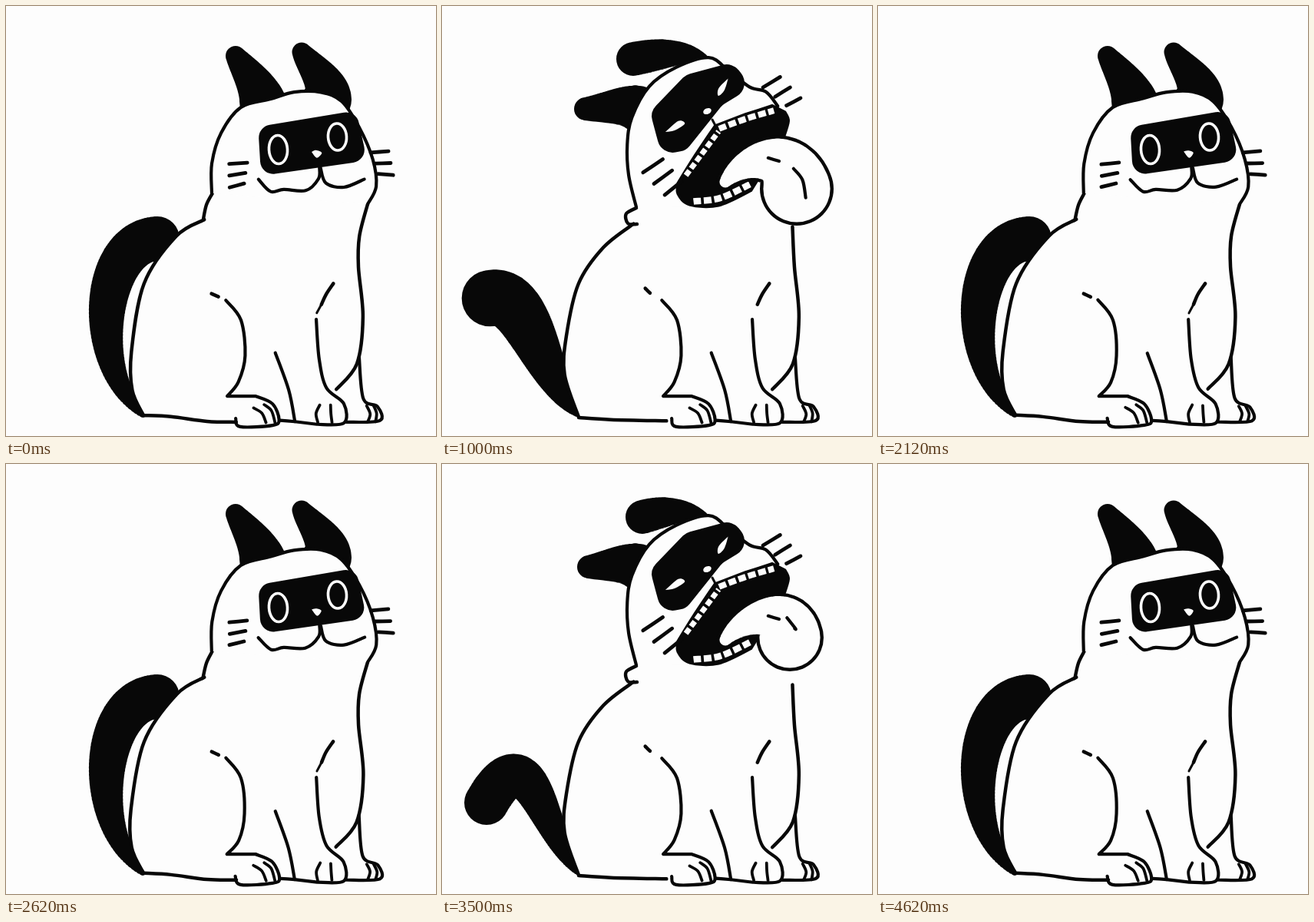
Write an HTML page with a canvas that moves like this. It is 560 px wide and 560 px high and loops after 4.75 s.

```html
<!DOCTYPE html>
<html lang="en">
<head>
<meta charset="utf-8">
<title>Cat</title>
<style>
  html, body { margin: 0; width: 100%; height: 100%; overflow: hidden; background: #fdfdfd; }
  canvas { display: block; width: 100vmin; height: 100vmin; }
</style>
</head>
<body>
<canvas id="stage" width="560" height="560"></canvas>
<script>
const ctx = document.getElementById('stage').getContext('2d');
const INK = '#080808', PAPER = '#fdfdfd';
const LOOP = 4750;
let boil = 0;

const parse = text => text.split(' ').map(p => p.split(',').map(Number));
const mix = (a, b, t) => a + (b - a) * t;

// Small repeatable wobble, so that shared points stay joined
function wobble([x, y]) {
  const noise = seed => {
    const n = Math.sin(x * 12.99 + y * 78.23 + boil * seed) * 43758.5;
    return n - Math.floor(n) - 0.5;
  };
  return [x + noise(37.7) * 0.9, y + noise(83.2) * 0.9];
}

// Smooth curve through the points; "|" marks a sharp corner
function trace(text) {
  const path = new Path2D();
  text.split('|').forEach((part, n) => {
    const p = parse(part).map(wobble);
    path[n ? 'lineTo' : 'moveTo'](...p[0]);
    for (let i = 0; i < p.length - 1; i++) {
      const b = p[i], c = p[i + 1], a = p[i - 1] || b, d = p[i + 2] || c;
      path.bezierCurveTo(
        b[0] + (c[0] - a[0]) / 6, b[1] + (c[1] - a[1]) / 6,
        c[0] - (d[0] - b[0]) / 6, c[1] - (d[1] - b[1]) / 6, ...c);
    }
  });
  return path;
}

function line(text, width = 4.2, color = INK) {
  ctx.lineWidth = width;
  ctx.strokeStyle = color;
  ctx.stroke(trace(text));
}

function fill(text, color = PAPER) {
  ctx.fillStyle = color;
  ctx.fill(trace(text));
}

// Polygon with rounded corners
function patch(text, radius) {
  const p = parse(text).map(wobble), last = p[p.length - 1];
  ctx.beginPath();
  ctx.moveTo((last[0] + p[0][0]) / 2, (last[1] + p[0][1]) / 2);
  p.forEach((q, i) => ctx.arcTo(...q, ...p[(i + 1) % p.length], radius));
  ctx.fillStyle = INK;
  ctx.fill();
}

// Soft limb: discs along a Bezier curve, growing from radius r0 to r1
function limb([x0, y0, x1, y1, x2, y2, x3, y3], r0, r1, power = 1, color = INK, grow = 0) {
  const bezier = (a, b, c, d, t) => {
    const s = 1 - t;
    return a * s ** 3 + 3 * b * s * s * t + 3 * c * s * t * t + d * t ** 3;
  };
  ctx.fillStyle = color;
  ctx.beginPath();
  for (let t = 0; t <= 1; t += 1 / 64) {
    const x = bezier(x0, x1, x2, x3, t), y = bezier(y0, y1, y2, y3, t);
    const r = mix(r0, r1, 1 - (1 - t) ** power) + grow;
    ctx.moveTo(x + r, y);
    ctx.arc(x, y, r, 0, Math.PI * 2);
  }
  ctx.fill();
}

function oval(x, y, rx, ry, turn, ring) {
  ctx.beginPath();
  ctx.ellipse(x, y, rx, ry, turn, 0, Math.PI * 2);
  ctx.fillStyle = ctx.strokeStyle = PAPER;
  ctx.lineWidth = ring;
  if (ring) ctx.stroke(); else ctx.fill();
}

// Three strokes, each stepped on from the one before
function whiskers(x, y, stepX, stepY, dx, dy, turn = 0) {
  for (let i = 0; i < 3; i++) {
    const sx = x + i * stepX, sy = y + i * stepY;
    line(`${sx},${sy} ${sx + dx - i * 2},${sy + dy + i * turn}`, 4.8);
  }
}

function teeth(text, width, size) {
  ctx.lineCap = 'butt';
  ctx.setLineDash([size, 3.5]);
  line(text, width, PAPER);
  ctx.setLineDash([]);
  ctx.lineCap = 'round';
}

// ---- Tail: two control points, tip and tip radius, from curled to low ----
const TAIL = [
  [105, 470, 121, 306, 197, 303, 29],
  [130, 470, 140, 375, 90, 342, 38],
  [130, 470, 140, 355, 79, 363, 41],
  [130, 490, 108, 370, 60, 383, 36],
  [130, 480, 115, 340, 58, 441, 29]
];

// Whips out faster and faster, then floats back
function tailPlace(step) {
  const age = step < 19 ? step - 3 : step - 22;
  if (age <= 0 || age >= 13.8) return 0;
  return age < 6 ? 4 * (age / 6) ** 1.8 : 2 + 2 * Math.cos(Math.PI * (age - 6) / 7.8);
}

function drawTail(step) {
  const place = tailPlace(step), k = Math.min(3, Math.floor(place));
  const pose = TAIL[k].map((v, i) => mix(v, TAIL[k + 1][i], place - k));
  limb([178, 531, ...pose.slice(0, 6)], 5, pose[6], 2.2);
}

// ---- Body ----
function drawBody(howl) {
  const back = howl
    ? '250,284 210,314 178,362 162,430 160,480 178,535'
    : '258,278 222,300 180,362 163,450 164,500 179,533';
  const floor = howl ? '178,536 220,539 292,540' : '179,533 215,535 262,541 300,542';
  const belly = '430,499 457,466 465,405 459,340 ' + (howl ? '456,287' : '460,300 471,258');
  fill([back, floor, '440,540', belly, '440,230', '270,240'].join('|'));
  [back, floor, belly].forEach(part => line(part, 4.5));
  line(howl ? '253,263 240,271 242,283 254,284' : '257,278 261,259 269,244', 4.4);
  drawLegs(howl);
}

function drawLegs(howl) {
  line(howl ? '265,368 271,374' : '268,375 277,379', 4.5);
  line('286,383 306,409 311,455 303,490 288,508|325,508 347,518 356,539 347,546 305,548 299,537');
  line('357,540 376,541');
  line('351,452 368,500 376,541|405,545 440,543 440,518 417,497 408,460 404,408');
  line('460,458 465,511 484,522 487,540 443,542');
  line('426,361 417,375 411,389', 4.5);
  if (!howl) line('411,389 405,400', 3);
  // Toes
  for (let i = 0; i < 2; i++) {
    const side = i * 14;
    line(`${322 + side},${523 - i * 4} ${333 + side * 0.9},${530 - i * 3} ${339 + side * 0.8},543`, 3.8);
    line(`${409 + side},520 ${404 + side * 1.4},531 ${406 + side * 1.3},542`, 3.8);
    line(`${470 + i * 9},521 ${474 + i * 9},531 ${471 + i * 10},541`, 3.8);
  }
}

// ---- Calm head ----
function drawCalmHead() {
  limb([334, 124, 328, 102, 310, 82, 299, 65], 30, 13);
  limb([418, 122, 424, 103, 396, 78, 385, 60], 32, 12.5);
  const skull = '268,244 268,205 280,165 306,132 345,121 375,112 410,112 437,124 460,158 478,200 482,235 471,258';
  fill(skull);
  line(skull);
  patch('328,157 456,136 470,201 332,221', 17);
  oval(354.5, 187, 12, 18.5, -0.06, 3.6);
  oval(431.5, 170.5, 12, 17.5, -0.06, 3.6);
  fill('398,190 404,188 411,191 405,198 398,190');
  line('408,210 407,225 390,240 362,239 345,242 329,226');
  line('410,211 417,231 440,236 467,226');
  whiskers(291, 206, 0, 15, 23, -2, -1.5);
  whiskers(475, 191, 5, 14, 23, -2, 1.5);
}

// ---- Howling head; lift 0 to 1 flaps the tongue ----
function drawHowlHead(lift) {
  limb([346, 67, 318, 57, 285, 62, 249 + lift * 12, 69], 1, 22, 2);
  limb([256, 134, 238, 127, 215, 133, 187 + lift * 4, 134], 30, 15);
  const skull = '253,262 243,220 241,180 247,145 270,105 305,80 347,67 372,83 400,105 422,112 437,130';
  fill(skull + '|440,230|400,255|320,262');
  line(skull);
  patch('271,138 318,90 378,73 403,105 365,129 318,188 286,194', 20);
  fill('291,164 308,150 316,153 303,162 291,164');
  fill('373,95 360,107 360,117 368,110 373,95');
  oval(345.5, 137, 5.5, 3.7, -0.4);
  line('352,148 356,156', 3);

  const mouth = '308,231 328,198 356,157|395,141 430,130|446,138 451,150 444,172|402,240 360,259 322,258 308,245 308,231';
  fill(mouth, INK);
  line(mouth);
  teeth('318,221 333,200 360,163', 7, 8);
  teeth('361,160 395,147 432,136', 8, 10);
  teeth('328,255 362,250 402,232', 8.5, 10);

  const x = 462 - lift * 9, y = 238 - lift * 12;
  const tongue = [369, 229, 395, 195, 455, 185, x, y];
  limb(tongue, 10, 46 - lift * 4, 1, INK, 2);
  limb(tongue, 10, 46 - lift * 4, 1, PAPER, -2.4);
  line('425,198 439,202');
  line(`${x - 4},${y - 26} ${x + 7},${y - 12} ${x + 12 - lift * 6},${y + 12 - lift * 24}`);

  whiskers(262, 217, 14, 14.5, 26, -17);
  whiskers(418, 106, 15.5, 12, 22, -14, 2);
}

// ---- Timing ----
const HOWLS = [[6, 14], [25, 33]];

function draw(step) {
  boil = step % 4;
  const howl = HOWLS.some(([a, b]) => step >= a && step <= b);
  const lean = HOWLS.some(([a, b]) => step === a - 1 || step === b + 1);
  ctx.lineJoin = ctx.lineCap = 'round';
  ctx.fillStyle = PAPER;
  ctx.fillRect(0, 0, 560, 560);
  drawTail(step);
  drawBody(howl);
  ctx.save();
  if (lean) {
    ctx.translate(365, 265);
    ctx.scale(1, 1.035);
    ctx.rotate(-0.09);
    ctx.translate(-365, -265);
  }
  if (howl) drawHowlHead((1 - Math.cos(step * Math.PI / 4)) / 2);
  else drawCalmHead();
  ctx.restore();
}

// Steps last 125 ms, cut to whole hundredths of a second
const stepAt = ms => Math.ceil((Math.floor(ms / 10) + 1) / 12.5) - 1;

let shown = -1;
const begin = performance.now();
function tick() {
  const step = stepAt((performance.now() - begin) % LOOP);
  if (step !== shown) draw(shown = step);
  requestAnimationFrame(tick);
}
tick();
</script>
</body>
</html>
```
